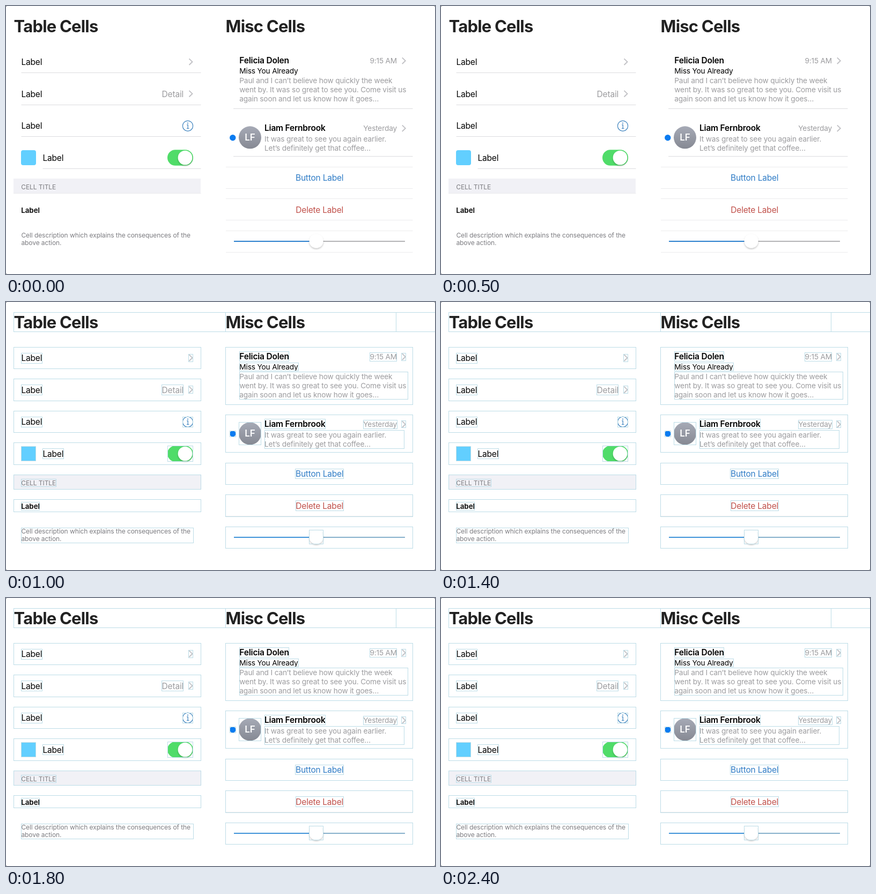
An HTML page that plays this animation: 800 px wide and 500 px high, repeating every 2.5 s.

```html
<!DOCTYPE html>
<html lang="en">
<head>
<meta charset="utf-8">
<title>Cells</title>
<style>
html, body { margin: 0; width: 100%; height: 100%; overflow: hidden; background: #777; }
svg { display: block; width: 800px; height: 500px; font-family: Inter, Roboto, sans-serif; }
.title { font-size: 31px; font-weight: 700; letter-spacing: -.8px; fill: #222; }
.label { font-size: 15.5px; letter-spacing: -.2px; }
.name { font-size: 15.5px; font-weight: 600; letter-spacing: -.2px; }
.body { font-size: 13.7px; letter-spacing: -.17px; }
.strong { font-size: 13.3px; font-weight: 600; }
.note { font-size: 12px; letter-spacing: -.08px; fill: #7c7c80; }
.grey { fill: #9c9c9f; }
.action { fill: #2f7cc6; }
.danger { fill: #c0504a; }
.initials { font-size: 17px; font-weight: 600; fill: #fff; }
.end { text-anchor: end; }
.middle { text-anchor: middle; }
.chevron { fill: none; stroke: #c0c0c4; stroke-width: 1.8; }
.info { fill: none; stroke: #3a80bd; stroke-width: 1.2; }
.rule { stroke: #dcdcdf; }
.faint { stroke: #ebebed; }
.track { stroke: #b3b3b5; stroke-width: 2; }
.track.filled { stroke: #2b7fcd; }
.knob { fill: #fff; filter: url(#shadow); }
#guides { display: none; fill: none; stroke: #bcdce7; }
.outlined #guides { display: inline; }
.outlined .rule { stroke: #8fc5d5; }
.outlined .track { stroke: #86b0cb; }
.outlined .track.filled { stroke: #3f93d8; }
</style>
</head>
<body>
<svg viewBox="0 0 800 500">
  <defs>
    <linearGradient id="avatar" x2="0" y2="1">
      <stop stop-color="#a6aab6"/><stop offset="1" stop-color="#868993"/>
    </linearGradient>
    <filter id="shadow" x="-30%" y="-30%" width="160%" height="170%">
      <feDropShadow dx="0" dy="1.8" stdDeviation="1.5" flood-opacity=".25"/>
    </filter>
  </defs>
  <rect width="800" height="500" rx="2.5" fill="#fff"/>
  <g id="art"></g>
  <g id="guides"></g>
</svg>
<script>
const svg = document.querySelector("svg");
const left = 14, right = 409, width = 349.5, pitch = 59.5, rowHeight = 41;

function add(tag, attrs, text = "", parent = "art") {
  const el = document.createElementNS("http://www.w3.org/2000/svg", tag);
  for (const k in attrs) el.setAttribute(k, attrs[k]);
  el.textContent = text;
  document.getElementById(parent).append(el);
  return el;
}

// Guide rectangle on whole pixels
function box(x, y, w, h) {
  const x0 = Math.floor(x), y0 = Math.floor(y);
  add("rect", {
    x: x0 + .5, y: y0 + .5,
    width: Math.ceil(x + w) - x0 - 1, height: Math.ceil(y + h) - y0 - 1
  }, "", "guides");
}
function outline(el, pad = 0) {
  const b = el.getBBox();
  box(b.x - pad, b.y - pad, b.width + 2 * pad, b.height + 2 * pad);
}

const text = (cls, x, y, s) => add("text", { class: cls, x, y }, s);
const boxed = (...args) => outline(text(...args));
const circle = (cx, cy, r, attrs) => add("circle", { cx, cy, r, ...attrs });
const path = (cls, d) => add("path", { class: cls, d });
const rule = (x1, x2, y, cls = "rule") => path(cls, `M${x1} ${Math.floor(y) + .5}H${x2}`);
const chevron = (x, y) => outline(path("chevron", `M${x} ${y}l6 5.8l-6 5.8`), 1);

function paragraph(cls, x, y, w, step, lines) {
  lines.forEach((s, i) => text(cls, x, y + i * step, s));
  box(x, y - step * .78, w, step * lines.length);
}

function row(x, i, top) {
  const y = top + i * pitch;
  box(x, y, width, rowHeight);
  return y;
}

function message(y, h, x, name, time) {
  box(right, y, width, h);
  rule(right + 15, right + width, y + h - 1);
  boxed("name", x, y + 23, name);
  boxed("body grey end", 729, y + 23.4, time);
  chevron(738.8, y + 12.4);
}

["Table Cells", "Misc Cells"].forEach((s, i) => {
  const x = i ? right : left;
  text("title", x + .6, 49, s);
  box(x, 19, 714, 37);
});

// Left column
for (let i = 0; i < 4; i++) {
  const y = row(left, i, 84), indent = i == 3 ? 54.5 : 14.5;
  boxed("label", left + indent, y + 26.3, "Label");
  rule(left + indent, left + width, y + rowHeight - .5);
  if (i < 2) chevron(341.5, y + 14.4);
  if (i == 1) boxed("label grey end", 331, y + 26.3, "Detail");
}
outline(circle(339, 223.7, 9.6, { class: "info" }));
path("info", "M337.2 221.7h2v6.7M337 228.5h4.4");
circle(339, 218.5, 1.1, { fill: "#3a80bd" });
outline(add("rect", { x: 28, y: 269, width: 28, height: 28, rx: 4, fill: "#62cfff" }));
outline(add("rect", { x: 301, y: 268.3, width: 48, height: 29.4, rx: 14.7, fill: "#50dc69" }));
circle(334, 283, 13.3, { class: "knob" });

add("rect", { x: left, y: 322, width: 349, height: 28, fill: "#f1f1f6" });
box(left, 322, width, 28);
rule(left, left + width, 349, "faint");
boxed("note", 28.3, 342, "CELL TITLE");
box(left, 368, width, 24);
boxed("strong", 28.2, 386, "Label");
paragraph("note", 28.4, 432, 321, 14, [
  "Cell description which explains the consequences of the",
  "above action."
]);

// Right column
message(84, 108, 435.3, "Felicia Dolen", "9:15 AM");
boxed("body", 435.3, 126, "Miss You Already");
paragraph("body grey", 435.3, 144, 314, 17, [
  "Paul and I can’t believe how quickly the week",
  "went by. It was so great to see you. Come visit us",
  "again soon and let us know how it goes…"
]);

message(210, 71, 482, "Liam Fernbrook", "Yesterday");
paragraph("body grey", 482, 252.5, 261, 17, [
  "It was great to see you again earlier.",
  "Let’s definitely get that coffee…"
]);
outline(circle(422.8, 245.8, 5.7, { fill: "#0a7bf0" }));
outline(circle(455, 245.3, 21, { fill: "url(#avatar)" }));
text("initials middle", 455, 251.3, "LF");

for (let i = 0; i < 3; i++) {
  const y = row(right, i, 300);
  for (const edge of [y, y + rowHeight - 1]) rule(right + 1, right + width, edge, "faint");
  if (i < 2) boxed("label middle " + ["action", "danger"][i], 584.7, y + 26,
                   ["Button", "Delete"][i] + " Label");
}
path("track filled", "M425 439H578");
path("track", "M578 439H744");
outline(circle(578.6, 438.5, 13, { class: "knob" }));

function frame(now) {
  svg.classList.toggle("outlined", now % 2500 >= 1000);
  requestAnimationFrame(frame);
}
frame(performance.now());
</script>
</body>
</html>
```
